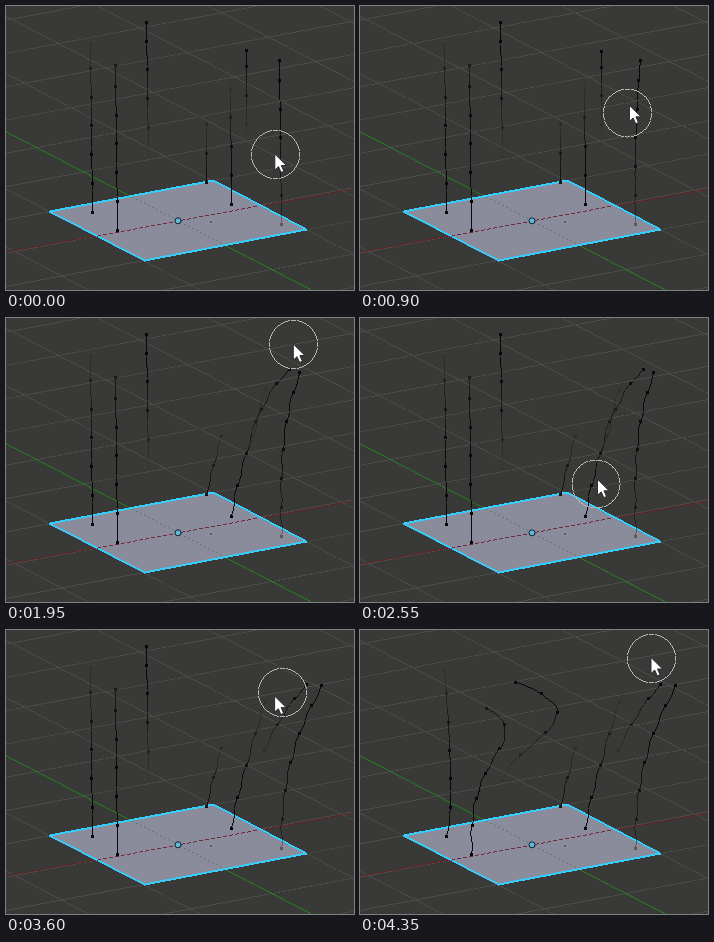
An HTML page with a canvas for the animation above (4.5 s loop, 348 px wide and 284 px high).

```html
<!DOCTYPE html>
<html lang="en">
<head>
<meta charset="utf-8">
<title>Combing hair strands</title>
<style>
  html, body { margin: 0; width: 100%; height: 100%; overflow: hidden; background: #393937; }
  canvas { display: block; width: 348px; height: 284px; }
</style>
</head>
<body>
<canvas id="stage" width="348" height="284"></canvas>
<script>
const WIDTH = 348, HEIGHT = 284, STEP = 150, STEPS = 30, SPACING = 28.7;
const ctx = document.getElementById('stage').getContext('2d');

const lerp = (a, b, k) => a + (b - a) * k;
const clamp = (v, low, high) => Math.max(low, Math.min(high, v));

// A pose bends a strand: the tip moves by lean and drop, following height ** power;
// the middle swells sideways by bulge, higher up for a larger skew.
const pose = (step, lean = 0, drop = 0, power = 2, bulge = 0, skew = 1) =>
  ({ step, lean, drop, power, bulge, skew });

// Opacity runs from root to tip.
const strands = [
  { root: [86.5, 206], tip: [84.5, 38], ink: [1.5, .15],
    poses: [pose(24), pose(27, 0, 2, 2, 5, .64)] },
  { root: [111.5, 224], tip: [109.5, 59], ink: [1.4, .6],
    poses: [pose(24), pose(28, 18, 19, 2, 24, 3)] },
  { root: [142.5, 150], tip: [140.5, 16], ink: [.08, 1.3],
    poses: [pose(25), pose(28, 16, 36, 1.5, 48, 1.4)] },
  { root: [200.5, 176], tip: [200.5, 117], ink: [.9, .12],
    poses: [pose(10), pose(13, 15, 0, 1)] },
  { root: [225.5, 198], tip: [224.5, 72], ink: [1.4, 0],
    poses: [pose(10), pose(13, 39, -13, 1.2)] },
  { root: [241.5, 204], tip: [240.5, 44], ink: [-.8, 1],
    poses: [pose(5), pose(8, 2, 4, 1), pose(10, 2, 4, 1), pose(13, 43, 7, 3.2),
      pose(20, 43, 7, 3.2), pose(24, 60, 10)] },
  { root: [275.5, 218], tip: [273.5, 54], ink: [.35, 1.3],
    poses: [pose(5), pose(8, 21, 0, 3.2), pose(17, 21, 0, 3.2), pose(20, 29, -2, 1.6),
      pose(23, 43, 1, 2.2)] }
];

const brushStop = (step, x, y) => ({ step, x, y });
const brushPath = [
  brushStop(0, 269.5, 148.5), brushStop(4, 260.5, 174.5), brushStop(5, 237, 190),
  brushStop(7, 298, 24), brushStop(9, 304.5, 46), brushStop(10, 306, 44),
  brushStop(11, 202, 172), brushStop(13, 287.5, 26.5), brushStop(15, 296, 40),
  brushStop(17, 236, 166), brushStop(20, 310.5, 25.5), brushStop(22, 230, 120),
  brushStop(24, 276.5, 62.5), brushStop(26, 92, 178), brushStop(28, 254, 90),
  brushStop(29, 291.5, 28.5)
];

// Blends every property of the two keys around the given step.
function blend(keys, step) {
  const next = keys.findIndex(key => key.step > step);
  if (next <= 0) return keys.at(next);
  const a = keys[next - 1], b = keys[next];
  const k = (step - a.step) / (b.step - a.step);
  return Object.fromEntries(Object.keys(a).map(name => [name, lerp(a[name], b[name], k)]));
}

// Hard-edged line without antialiasing.
function line(target, [x0, y0], [x1, y1], color, { tall = 1, on = 1, off = 0 } = {}) {
  const count = Math.max(1, Math.round(Math.max(Math.abs(x1 - x0), Math.abs(y1 - y0))));
  target.fillStyle = color;
  for (let i = 0; i < count; i++) {
    if (i % (on + off) >= on) continue;
    const k = i / count;
    target.fillRect(Math.floor(lerp(x0, x1, k)), Math.floor(lerp(y0, y1, k)), 1, tall);
  }
}

function polygon(target, points, color) {
  target.beginPath();
  points.forEach(([x, y]) => target.lineTo(x, y));
  target.closePath();
  target.fillStyle = color;
  target.fill();
}

function dot(target, x, y, color, size = 3) {
  target.fillStyle = color;
  target.fillRect(Math.floor(x - (size >> 1)), Math.floor(y - (size >> 1)), size, size);
}

const onFloor = (u, v) => [171.5 + u * 81.5 + v * 47, 214.7 - u * 15.4 + v * 24.4];

function makeScene() {
  const canvas = Object.assign(document.createElement('canvas'), { width: WIDTH, height: HEIGHT });
  const scene = canvas.getContext('2d');
  scene.fillStyle = '#393937';
  scene.fillRect(0, 0, WIDTH, HEIGHT);
  for (let i = -8; i <= 8; i++) {
    line(scene, onFloor(i, -9), onFloor(i, 9), '#4b4b49');
    line(scene, onFloor(-9, i), onFloor(9, i), '#4b4b49');
  }
  line(scene, [0, 126], [305, 284], '#1d7f1d');
  line(scene, [0, 246], [348, 183], '#701c22', { on: 4, off: 1 });

  const corners = [[43, 206], [207, 175], [300, 224], [138, 255]];
  polygon(scene, corners, '#8a8b9b');
  corners.forEach(([x, y], i) => {
    const [endX, endY] = corners[(i + 1) % 4];
    line(scene, [x, y - 1], [endX, endY - 1], '#35cdfb', { tall: 2 });
  });
  line(scene, [126, 191], [218, 239], '#597f69', { on: 2, off: 2 });
  line(scene, [91, 230], [252, 200], '#702b38', { on: 4, off: 2 });

  scene.beginPath();
  scene.arc(172, 214.8, 3, 0, Math.PI * 2);
  scene.fillStyle = '#5fb6d6';
  scene.fill();
  scene.strokeStyle = '#10202a';
  scene.stroke();
  dot(scene, 205.5, 216.5, '#5c6255', 2);
  return canvas;
}

function drawStrand({ root, tip, ink, poses }, step) {
  const { lean, drop, power, bulge, skew } = blend(poses, step);
  const height = root[1] - tip[1];
  const wave = Math.min(1, (Math.abs(lean) + bulge) / 20);
  const pointAt = rise => {
    const t = rise / height, bend = t ** power;
    const sway = bulge * Math.sin(Math.PI * t ** skew) + wave * Math.sin(rise / SPACING * 2 * Math.PI);
    return [lerp(root[0], tip[0], t) + lean * bend + sway, root[1] - rise + drop * bend];
  };
  const color = rise => `rgba(8,8,8,${clamp(lerp(ink[0], ink[1], rise / height), 0, 1)})`;

  const pieces = 32;
  for (let i = 0; i < pieces; i++) {
    const rise = height * i / pieces;
    line(ctx, pointAt(rise), pointAt(height * (i + 1) / pieces), color(rise));
  }
  for (let rise = 0; rise < height; rise += SPACING) dot(ctx, ...pointAt(rise), color(rise));
  dot(ctx, ...pointAt(height), color(height));
}

function drawBrush(step) {
  const { x, y } = blend(brushPath, step);
  const rim = i => [x + 24 * Math.cos(i * Math.PI / 32), y + 24 * Math.sin(i * Math.PI / 32)];
  for (let i = 0; i < 64; i++) line(ctx, rim(i), rim(i + 1), '#b5b5b3');

  // The pointer runs slightly ahead of the ring.
  const pointer = blend(brushPath, step + .08);
  const arrow = [[0, 0], [0, 16], [3.7, 12.6], [6.3, 18.4], [9, 17.2], [6.5, 11.5], [11.5, 11.5]];
  polygon(ctx, arrow.map(([dx, dy]) => [pointer.x - .5 + dx, pointer.y - 1 + dy]), '#fff');
  ctx.lineWidth = .9;
  ctx.strokeStyle = '#222';
  ctx.stroke();
}

const scene = makeScene();
const start = performance.now();

function tick() {
  const step = Math.floor((performance.now() - start) / STEP) % STEPS;
  ctx.drawImage(scene, 0, 0);
  strands.forEach(strand => drawStrand(strand, step));
  dot(ctx, 275.5, 218, '#665448');
  drawBrush(step);
  requestAnimationFrame(tick);
}
tick();
</script>
</body>
</html>
```
